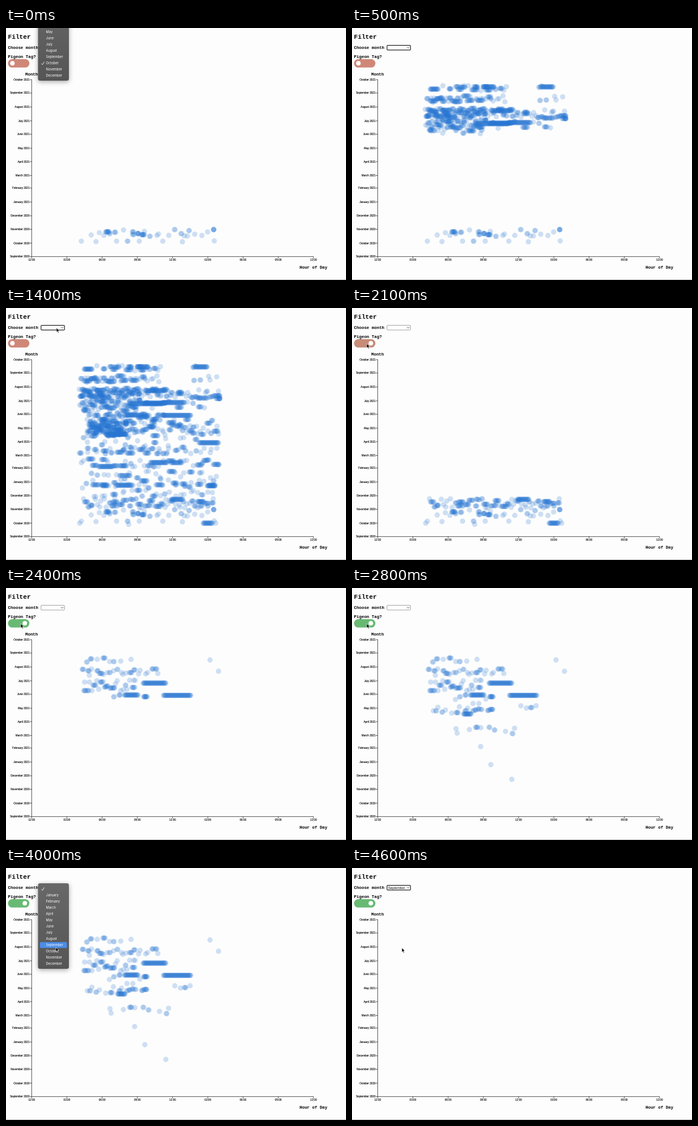
Recreate the animation shown at these times as an HTML page with a canvas. Size 600x445 px, loop 5000 ms.

```html
<!DOCTYPE html>
<html lang="en">
<head>
<meta charset="utf-8">
<title>Pigeon sightings</title>
<style>
  html, body { margin: 0; width: 100%; height: 100%; overflow: hidden; background: #fdfdfd; }
  canvas, svg { position: absolute; left: 0; top: 0; width: 600px; height: 445px; }
  .head { font: bold 7.43px "Liberation Mono", monospace; }
  .title { font-size: 11.1px; }
  .tick { font: 4.7px "Liberation Sans", sans-serif; stroke: #000; stroke-width: .12; }
  .item { font: 5.8px Inter, sans-serif; fill: #fff; }
  .picked { font: 6.1px "Liberation Sans", sans-serif; }
  .line { fill: none; stroke: #222; stroke-width: .8; }
  .panel { filter: drop-shadow(0 2px 4px rgba(0, 0, 0, .35)); }
</style>
</head>
<body>
<canvas id="plot"></canvas>
<svg viewBox="0 0 600 445">
  <defs>
    <linearGradient id="shade" x2="0" y2="1">
      <stop stop-color="#686868"/><stop offset="1" stop-color="#555"/>
    </linearGradient>
  </defs>
  <path d="M0 444.5H600" stroke="#bbb"/>
  <g class="head">
    <text class="title" x="3.6" y="18.5">Filter</text>
    <text x="3.6" y="37.3">Choose month</text>
    <text x="3.6" y="52.8">Pigeon Tag?</text>
    <text x="34" y="84.3">Month</text>
    <text x="518" y="424.6">Hour of Day</text>
  </g>
  <rect id="box" x="61.8" y="30.6" width="41.5" height="8.3" rx="1.3" fill="#fff"/>
  <path d="M97 33.6l2.1 2.1 2.1-2.1" class="line"/>
  <text id="picked" class="picked" x="63.8" y="37">September</text>
  <rect id="track" x="3.5" y="55" width="37.8" height="14.8" rx="7.4"/>
  <circle id="knob" cy="62.3" r="4" fill="#fff"/>
  <g id="axes"></g>
  <g id="menu">
    <rect class="panel" x="56.5" y="27" width="54.5" height="151" rx="3.5" fill="url(#shade)"/>
    <rect id="hover" x="59.8" width="47.8" height="10.6" rx="2" fill="#4a8ce8"/>
    <path id="check" d="M-2.4 .5L-.7 2.4 2.5-2.6" fill="none" stroke="#fff" stroke-width=".9"/>
    <g id="items"></g>
  </g>
  <path id="cursor" d="M0 0V7.6L1.7 6 3 9 4.3 8.4 3 5.5H5.4Z" fill="#000" stroke="#fff" stroke-width=".6"/>
</svg>
<script>
const $ = id => document.getElementById(id);
const months = ['January', 'February', 'March', 'April', 'May', 'June', 'July',
  'August', 'September', 'October', 'November', 'December'];
const LOOP = 5000, STEP = 100, DAY = .791;

function put(parent, tag, attrs, text = '') {
  const el = document.createElementNS('http://www.w3.org/2000/svg', tag);
  for (const k in attrs) el.setAttribute(k, attrs[k]);
  el.textContent = text;
  $(parent).append(el);
}
const clamp = v => Math.max(0, Math.min(1, v));
const ramp = (t, t0, t1, a, b) => a + (b - a) * clamp((t - t0) / (t1 - t0));

// Axes and menu entries
const first = Date.UTC(2020, 8), span = Date.UTC(2021, 9) - first;
let lines = 'M45.3 91V403.7H542.7';
for (let i = 0; i < 14; i++) {
  const date = Date.UTC(2020, 8 + i), y = 403.7 - 312.6 * (date - first) / span;
  lines += `M42.3 ${y}H45.3`;
  put('axes', 'text', { x: 41.6, y: y + 1.6, class: 'tick', 'text-anchor': 'end' },
    `${months[(8 + i) % 12]} ${i < 4 ? 2020 : 2021}`);
}
for (let i = 0; i < 9; i++) {
  const x = 45.3 + i * 62.17;
  lines += `M${x} 403.7V406.6`;
  put('axes', 'text', { x, y: 411.3, class: 'tick', 'text-anchor': 'middle' },
    ['12', '03', '06', '09'][i % 4] + ':00');
}
put('axes', 'path', { d: lines, class: 'line' });
months.forEach((m, i) => put('items', 'text', { x: 70.6, y: 50.2 + i * 11, class: 'item' }, m));

let seed = 11;
const rnd = () => (seed = (seed * 16807) % 2147483647) / 2147483647;

// One visit: a row of sightings on the same day
const visit = (x0, x1, y) => {
  const n = 3 + Math.round(x1 - x0);
  return Array.from({ length: n }, (_, i) => [x0 + (x1 - x0) * i / (n - 1), y]);
};

// Mostly short visits spread evenly over the hours, on random days
function spread(x0, x1, y0, y1, count, longest = 10) {
  const dots = [];
  for (let i = 0; i < count; i++) {
    const x = x0 + (x1 - x0) * (i + rnd()) / count;
    const y = y0 + Math.floor((y1 - y0) / DAY * rnd()) * DAY;
    const n = 1 + Math.floor(longest * rnd() ** 3);
    for (let k = 0; k < n; k++) dots.push([Math.min(x1, x + k * 1.2), y]);
  }
  return dots;
}

const october = [
  ...spread(133, 281, 376.5, 378, 6, 3), ...spread(148, 320, 356, 369, 16, 4),
  ...spread(302, 372, 357, 378, 7, 3),
  ...visit(176, 182, 360), ...visit(232, 234, 363), ...visit(239, 244, 365), ...visit(366, 367, 356)];

const tagged = [
  ...spread(131, 222, 122, 131, 8, 4),
  ...spread(133, 271, 143, 156, 23, 5),
  ...spread(134, 230, 163, 182, 25, 5),
  ...spread(176, 242, 189, 206, 6, 3),
  ...spread(137, 248, 209, 222, 16, 6),
  ...spread(297, 326, 208, 213, 4, 5),
  ...spread(172, 298, 246, 258, 10, 4),
  ...visit(209, 233, 189), ...visit(242, 282, 168), ...visit(278, 326, 189.6),
  ...visit(243, 249, 192), ...visit(197, 210, 222.5),
  [360, 127], [375, 147], [227, 280], [245, 312], [282, 338]];

const others = [
  ...spread(160, 275, 102, 111, 20), ...spread(324, 340, 103, 105, 2),
  ...spread(130, 272, 120, 131, 30), ...spread(324, 373, 120, 130, 4, 3),
  ...spread(128, 236, 142, 160, 72), ...spread(236, 377, 144, 160, 36),
  ...spread(128, 236, 162, 182, 42), ...spread(236, 362, 162, 180, 9),
  ...spread(141, 282, 185, 199, 40),
  ...spread(143, 212, 200, 227, 84), ...spread(212, 376, 197, 228, 46),
  ...spread(128, 340, 229, 245, 15, 5),
  ...spread(128, 376, 246, 258, 32),
  ...spread(128, 376, 266, 282, 34),
  ...spread(143, 376, 288, 302, 22),
  ...spread(130, 370, 302, 320, 32),
  ...spread(148, 370, 322, 334, 26, 6),
  ...spread(134, 367, 337, 354, 58, 8),
  ...visit(138, 152, 108), ...visit(232, 251, 104), ...visit(335, 355, 104),
  ...visit(247, 281, 146), ...visit(218, 276, 169), ...visit(276, 315, 167),
  ...visit(176, 211, 223), ...visit(341, 375, 238), ...visit(255, 284, 273),
  ...visit(165, 188, 280), ...visit(195, 222, 313), ...visit(355, 369, 314),
  ...visit(292, 312, 338), ...visit(338, 349, 342), ...visit(348, 364, 380),
  [130, 380], [370, 380], [216.5, 382]];

const all = [...others, ...tagged, ...october];

// Newest days arrive and leave first
function visible(t) {
  if (t < 400) return october;
  if (t < 1900) {
    const y = t < 700 ? ramp(t, 400, 700, 91, 379) : ramp(t, 700, 1000, 379, 390);
    return all.filter(d => d[1] <= y || d[1] > 355 && d[1] < 379);
  }
  if (t < 2200) return all.filter(d => d[1] >= ramp(t, 1900, 2100, 91, 335));
  if (t < 4600) return tagged.filter(d => d[1] <= ramp(t, 2200, 2700, 91, 345));
  return [];
}

const dpr = window.devicePixelRatio || 1, plot = $('plot'), ctx = plot.getContext('2d');
plot.width = 600 * dpr;
plot.height = 445 * dpr;
ctx.scale(dpr, dpr);
ctx.fillStyle = 'rgba(42, 118, 208, .22)';

function drawDots(t) {
  ctx.clearRect(0, 0, 600, 445);
  for (const [x, y] of visible(t)) {
    ctx.beginPath();
    ctx.arc(x, y, 4.7, 0, 7);
    ctx.fill();
  }
}

// Pointer stops: time, x, y
const path = [[1600, 89, 35], [1900, 26, 63], [3000, 26, 63], [3400, 88, 35],
  [3600, 88, 35], [4000, 88, 140], [4500, 88, 141]];
function pointer(t) {
  const i = path.findIndex(p => p[0] > t);
  if (i < 1) return path[i ? path.length - 1 : 0].slice(1);
  const [t0, x0, y0] = path[i - 1], [t1, x1, y1] = path[i];
  return [ramp(t, t0, t1, x0, x1), ramp(t, t0, t1, y0, y1)];
}

const show = (id, on) => $(id).style.display = on ? '' : 'none';
const set = (id, attrs) => { for (const k in attrs) $(id).setAttribute(k, attrs[k]); };

function draw(t) {
  drawDots(t);
  const [x, y] = pointer(t), early = t < 400, open = t >= 3500 && t < 4500;
  show('cursor', t >= 1000);
  set('cursor', { transform: `translate(${x} ${y})` });

  show('menu', early || open);
  show('hover', open);
  set('menu', { transform: `translate(0 ${early ? -85 : 0})` });
  set('check', { transform: `translate(65 ${early ? 147.3 : 37})` });
  set('hover', { y: 31.7 + 11 * Math.max(0, Math.round((y - 37.5) / 11)) });

  const focus = t < 1900 || t >= 3500;
  set('box', { stroke: focus ? '#222' : '#888', 'stroke-width': focus ? 1.2 : .8 });
  show('picked', t >= 4600);

  const c = (a, b) => Math.round(ramp(t, 2085, 2285, a, b));
  set('track', { fill: `rgb(${c(207, 104)}, ${c(136, 186)}, ${c(120, 115)})` });
  set('knob', { cx: ramp(t, 1900, 2100, 11.3, 33.2) });
}

let last = -1;
function tick(now) {
  const t = Math.floor(now % LOOP / STEP) * STEP;
  if (t !== last) draw(last = t);
  requestAnimationFrame(tick);
}
draw(0);
requestAnimationFrame(tick);
</script>
</body>
</html>
```
